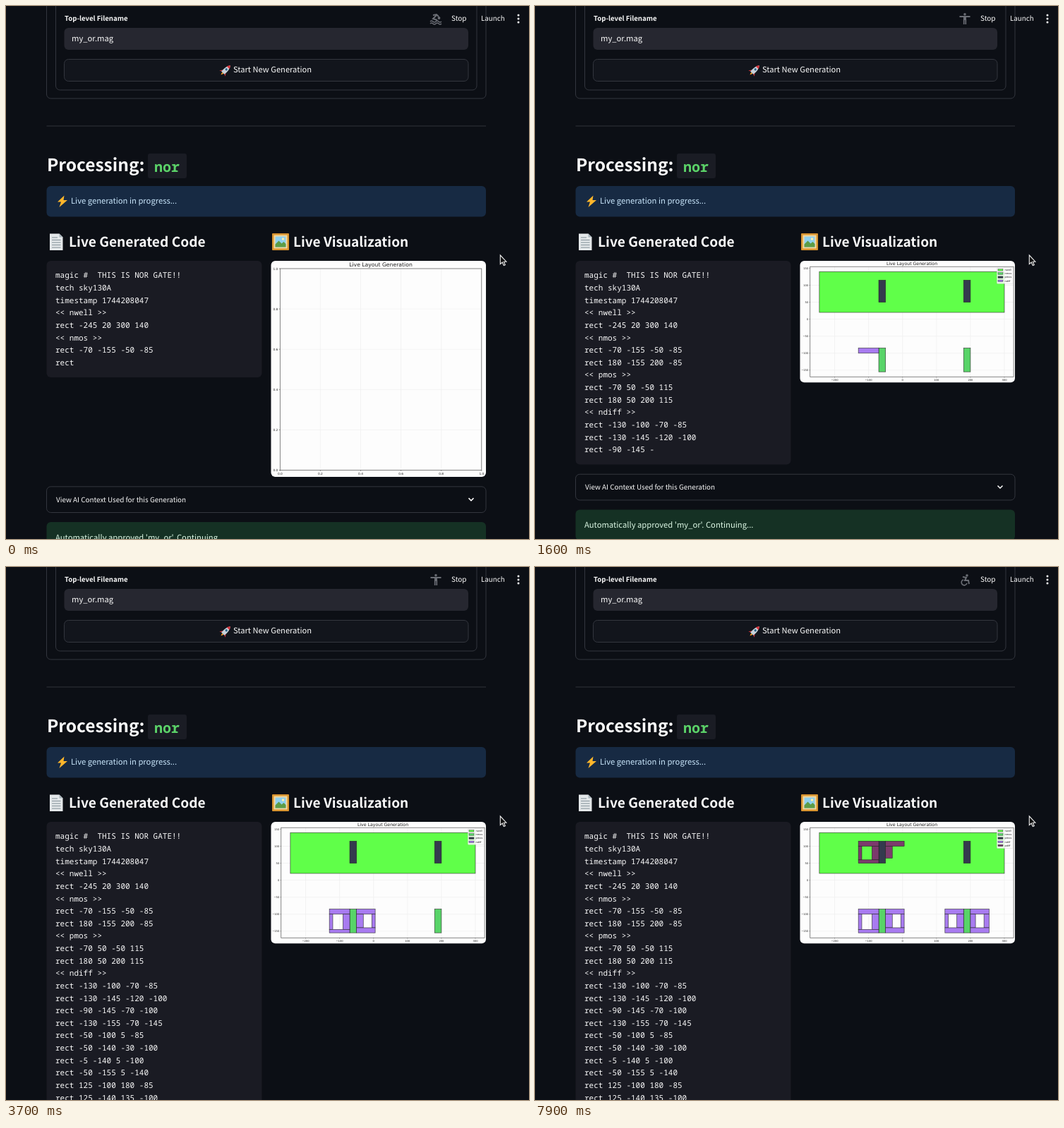
An HTML page that plays this animation: 741x755 px, repeating every 8000 ms.

```html
<!DOCTYPE html>
<html lang="en">
<head>
<meta charset="utf-8">
<title>Live layout generation</title>
<style>
html, body { margin: 0; width: 100%; height: 100%; overflow: hidden; background: #0c0f15; }
svg { display: block; width: 741px; height: 755px; }
text { white-space: pre; fill: #fafafa; font-family: "Noto Sans CJK JP", "Noto Sans CJK SC", "Noto Sans", sans-serif; text-rendering: geometricPrecision; }
.mono { font-family: "Noto Sans Mono", "DejaVu Sans Mono", monospace; }
.plot text { fill: #222; font-family: "DejaVu Sans", sans-serif; }
</style>
</head>
<body>
<svg viewBox="0 0 741 755">
  <g id="page"></g>
  <g id="live"></g>
  <path d="M700.3 353v12.6l2.9-2.6 2.1 4.6 2-.9-2-4.5h3.6z" fill="#111" stroke="#eee" stroke-width="1.1"/>
</svg>
<script>
const LOOP = 8000, STEP = 100;
const LAG = 40;          // characters between typing a rect and plotting it
const SCALE = 0.481;     // pixels per layout unit

const COLORS = { nwell: '#60ff49', nmos: '#58d468', pmos: '#343a4e', ndiff: '#a87bf0', pdiff: '#7b3b6c' };

const source = `magic #  THIS IS NOR GATE!!
tech sky130A
timestamp 1744208047
<< nwell >>
rect -245 20 300 140
<< nmos >>
rect -70 -155 -50 -85
rect 180 -155 200 -85
<< pmos >>
rect -70 50 -50 115
rect 180 50 200 115
<< ndiff >>
rect -130 -100 -70 -85
rect -130 -145 -120 -100
rect -90 -145 -70 -100
rect -130 -155 -70 -145
rect -50 -100 5 -85
rect -50 -140 -30 -100
rect -5 -140 5 -100
rect -50 -155 5 -140
rect 125 -100 180 -85
rect 125 -140 135 -100
rect 160 -140 180 -100
rect 125 -155 180 -140
rect 200 -100 255 -85
rect 200 -140 215 -100
rect 240 -140 255 -100
rect 200 -155 255 -140
<< pdiff >>
rect -130 100 -70 115
rect -130 60 -120 100
rect -90 60 -70 100
rect -130 50 -70 60
rect -50 100 5 115
rect -50 65 -30 100
rect -5 65 5 100
rect -50 50 5 65
rect 125 100 180 115`;

// Start offset of each line, and every rect with the offset where it ends
const starts = [], shapes = [];
let offset = 0, layer = '';
for (const line of source.split('\n')) {
  starts.push(offset);
  if (line.startsWith('<<')) layer = line.split(' ')[1];
  if (line.startsWith('rect')) {
    const [x1, y1, x2, y2] = line.split(' ').slice(1).map(Number);
    shapes.push({ layer, x1, y1, x2, y2, end: offset + line.length });
  }
  offset += line.length + 1;
}

// Typing progress: time, line, column
const typing = [[0, 7, 4], [500, 9, 8], [1600, 14, 15], [2800, 19, 11], [4700, 25, 4],
  [5900, 30, 5], [6600, 31, 18], [7900, 37, 12], [8000, 37, 18]]
  .map(([time, line, col]) => [time, starts[line] + col]);

function typedAt(t) {
  const i = typing.findIndex(k => k[0] > t);
  const [t0, c0] = typing[i - 1], [t1, c1] = typing[i];
  return Math.floor(c0 + (c1 - c0) * (t - t0) / (t1 - t0));
}

const esc = s => s.replace(/</g, '&lt;').replace(/>/g, '&gt;');
const text = (x, y, size, s, attrs = '') => `<text x="${x}" y="${y}" font-size="${size}" ${attrs}>${esc(s)}</text>`;
const box = (x, y, w, h, fill, r = 0, attrs = '') =>
  `<rect x="${x}" y="${y}" width="${w}" height="${h}" rx="${r}" fill="${fill}" ${attrs}/>`;
const path = (d, stroke, width, fill = 'none') =>
  `<path d="${d}" stroke="${stroke}" stroke-width="${width}" fill="${fill}"/>`;
const dot = (x, y, r, fill) => `<circle cx="${x}" cy="${y}" r="${r}" fill="${fill}"/>`;

const BORDER = 'stroke="#33363e"', SEMI = 'font-weight="600"', MID = 'text-anchor="middle"', END = 'text-anchor="end"';

const rocket = `<g transform="translate(311.5 90.5) rotate(45)">
  ${path('M-3 3l-3 4 3-1zM3 3l3 4-3-1z', 'none', 0, '#d8343c')}
  ${path('M-1.5 6L0 10l1.5-4z', 'none', 0, '#ffa726')}
  ${path('M0-9Q4-4 3 6H-3Q-4-4 0-9z', 'none', 0, '#c9d3da')}
  ${path('M0-9Q2-7 2.6-4.5H-2.6Q-2-7 0-9z', 'none', 0, '#d8343c')}${dot(0, -1, 1.6, '#29648a')}</g>`;

const sheet = path('M62 322.5h13.5l5 5V346H62z', 'none', 0, '#e4e8ea') + path('M75.5 322.5v5h5z', 'none', 0, '#a9b5bc') +
  path('M65 328h8M65 331.5h12.5M65 335h12.5M65 338.5h12.5M65 342h12.5', '#7f8d95', 1);

const picture = box(377, 322, 24, 24, '#d9942f', 1) + box(379.5, 324.5, 19, 19, '#f4d9a0') +
  box(381.5, 326.5, 15, 15, '#8fd0ee') + path('M381.5 341.5v-4l5-5 4 4 3-2.5 3 3v4.5z', 'none', 0, '#5d9c46') +
  dot(392.5, 330, 1.7, '#fff3b0');

page.innerHTML =
  box(57.5, -20, 622.5, 151, 'none', 6, BORDER) + box(70.5, -20, 596.5, 139, 'none', 6, BORDER) +
  text(83, 21.3, 9.6, 'Top-level Filename', SEMI) +
  box(82.5, 31, 572.5, 31, '#262730', 6) + text(93, 50.4, 11.24, 'my_or.mag') +
  box(82.5, 75.5, 572.5, 31, '#12151c', 6, BORDER) + rocket + text(322, 94.4, 11.15, 'Start New Generation') +
  text(631, 21.3, 10, 'Stop') + text(673, 21.3, 9.8, 'Launch') +
  [13, 18, 23].map(y => dot(726, y, 1.5, '#fafafa')).join('') +
  path('M57.5 170H680', '#30333b', 1) +
  text(58, 234, 24.5, 'Processing:', SEMI) + box(201, 209, 55, 35, '#1a1c24', 3) +
  text(210, 235, 20, 'nor', 'class="mono" font-weight="600" style="fill:#5bd268"') +
  box(57.5, 255, 622.5, 43.5, '#172a43', 6) +
  path('M82.5 268.5l-9.5 9h5l-2.5 7.5 11.5-10h-5.5z', 'none', 0, '#ffb62b') +
  text(92, 280.4, 11.24, 'Live generation in progress...', 'style="fill:#c9e6fb"') +
  sheet + text(89, 341, 19.15, 'Live Generated Code', SEMI) +
  picture + text(407, 341, 19.05, 'Live Visualization', SEMI);

// Status figures, drawn around their own centre
const GREY = '#6a6d74';
const limb = (d, w = 2) => path(d, GREY, w);
const figures = {
  s: dot(4.5, -1, 1.9, GREY) + limb('M-4-5L1-6L4-3M1-5L-4 0L2 2') +
    limb('M-8 4q2-2 4 0t4 0t4 0t4 0M-8 7q2-2 4 0t4 0t4 0t4 0', 1.4),
  w: dot(3, -6, 1.8, GREY) + limb('M-3-4L2-3L0 1H5L6 6') + limb('M-2-0A4 4 0 1 0 3 5', 1.7),
  a: dot(0, -6.3, 1.8, GREY) + limb('M-7.5-3H7.5') + limb('M0-3V2', 4) + limb('M-1.3 1V8M1.3 1V8', 1.7),
  r: dot(2.5, -6.3, 1.8, GREY) + limb('M-5-1V-3L0-4L3-1L6 0M0-4L-1 1L2 4V8.5M-1 1L-2 4L-7 4'),
  k: dot(3.5, -6, 1.8, GREY) + limb('M-4-3L2-3.5L5 0M2-3L-2 1L2 4L1 8M-2 1L-6 6') + limb('M-8 6l3 2M-1 8h5', 1.3)
};
const figureAt = t => `<g transform="translate(609 18)">${figures['skwrasrkaw'[Math.floor(t / 200) % 10]]}</g>`;

const GRID = '#ececec';
const range = (from, to, step) => {
  const out = [];
  for (let v = Math.ceil(from / step) * step; v <= to; v += step) out.push(v);
  return out;
};
const label = v => String(v).replace('-', '−');

function emptyPlot() {
  let out = box(375.5, 361, 304.5, 306, '#fdfdfd', 6) + text(531, 369.3, 7.7, 'Live Layout Generation', MID);
  for (let i = 0; i <= 5; i++) {
    const x = 388.3 + 57.1 * i, y = 657.5 - 57.1 * i, s = (i / 5).toFixed(1);
    out += path(`M${x} 372V657.5M388.3 ${y}H673.8`, GRID, 0.6) + path(`M${x} 657.5v1.5M388.3 ${y}h-1.5`, '#333', 0.5) +
      text(x, 663.6, 4.3, s, MID) + text(385.3, y + 1.6, 4.3, s, END);
  }
  return { svg: out + box(388.3, 372, 285.5, 285.5, 'none', 0, 'stroke="#555" stroke-width=".7"'), bottom: 667 };
}

function layoutPlot(shown) {
  const lo = Math.min(...shown.map(s => s.y1)), hi = Math.max(...shown.map(s => s.y2));
  const pad = (hi - lo) * 0.05, top = 369.2;
  const px = x => 520.7 + SCALE * x, py = y => top + SCALE * (hi + pad - y);
  const left = px(-272.25), right = px(327.25), base = py(lo - pad);
  let out = box(375.5, 361, 304.5, base + 8 - 361, '#fdfdfd', 6) + text(534, 367.4, 6.2, 'Live Layout Generation', MID);
  for (const v of range(-200, 300, 100)) {
    out += path(`M${px(v)} ${top}V${base}`, GRID, 0.6) + path(`M${px(v)} ${base}v1.2`, '#333', 0.5) +
      text(px(v), base + 5.6, 3.7, label(v), MID);
  }
  for (const v of range(lo - pad, hi + pad, hi - lo < 200 ? 20 : 50)) {
    out += path(`M${left} ${py(v)}H${right}`, GRID, 0.6) + path(`M${left} ${py(v)}h-1.2`, '#333', 0.5) +
      text(387.3, py(v) + 1.4, 3.7, label(v), END);
  }
  for (const s of shown) {
    out += box(px(s.x1), py(s.y2), SCALE * (s.x2 - s.x1), SCALE * (s.y2 - s.y1), COLORS[s.layer], 0,
      'stroke="#222" stroke-opacity=".8" stroke-width=".7"');
  }
  out += box(left, top, right - left, base - top, 'none', 0, 'stroke="#555" stroke-width=".7"');
  const layers = [...new Set(shown.map(s => s.layer))];
  out += box(654.5, 370.7, 22.6, 2 + 5.15 * layers.length, '#fff', 1, 'fill-opacity=".85" stroke="#ccc" stroke-width=".4"');
  layers.forEach((name, i) => {
    const y = 372.6 + 5.15 * i;
    out += box(656, y, 7, 2.5, COLORS[name], 0, 'stroke="#222" stroke-width=".4"') + text(665.5, y + 2.5, 3.6, name);
  });
  return { svg: out, bottom: base + 8 };
}

function draw(t) {
  const typed = typedAt(t);
  const lines = source.slice(0, typed).split('\n');
  const shown = shapes.filter(s => s.end + LAG <= typed);
  const plot = shown.length ? layoutPlot(shown) : emptyPlot();
  const codeHeight = 24 + 17.63 * lines.length;
  const y = Math.max(361 + codeHeight, plot.bottom) + 13.8;
  live.innerHTML = figureAt(t) + box(57.5, 361, 305, codeHeight, '#1a1b23', 6) +
    lines.map((s, i) => text(70, 385.4 + 17.63 * i, 11, s, 'class="mono"')).join('') +
    `<g class="plot">${plot.svg}</g>` +
    box(57.5, y, 622.5, 36.7, 'none', 6, BORDER) +
    text(71, y + 21.7, 9.9, 'View AI Context Used for this Generation', 'font-weight="500"') +
    path(`M655.5 ${y + 16.3}l3.5 3.5 3.5-3.5`, '#fafafa', 1.5) +
    box(57.5, y + 50.3, 622.5, 43.5, '#153124', 6) +
    text(70, y + 75.8, 11.24, "Automatically approved 'my_or'. Continuing...", 'style="fill:#dcf7e4"');
}

let last = -1;
function tick() {
  const t = Math.floor(performance.now() % LOOP / STEP) * STEP;
  if (t !== last) draw(last = t);
  requestAnimationFrame(tick);
}
tick();
</script>
</body>
</html>
```
